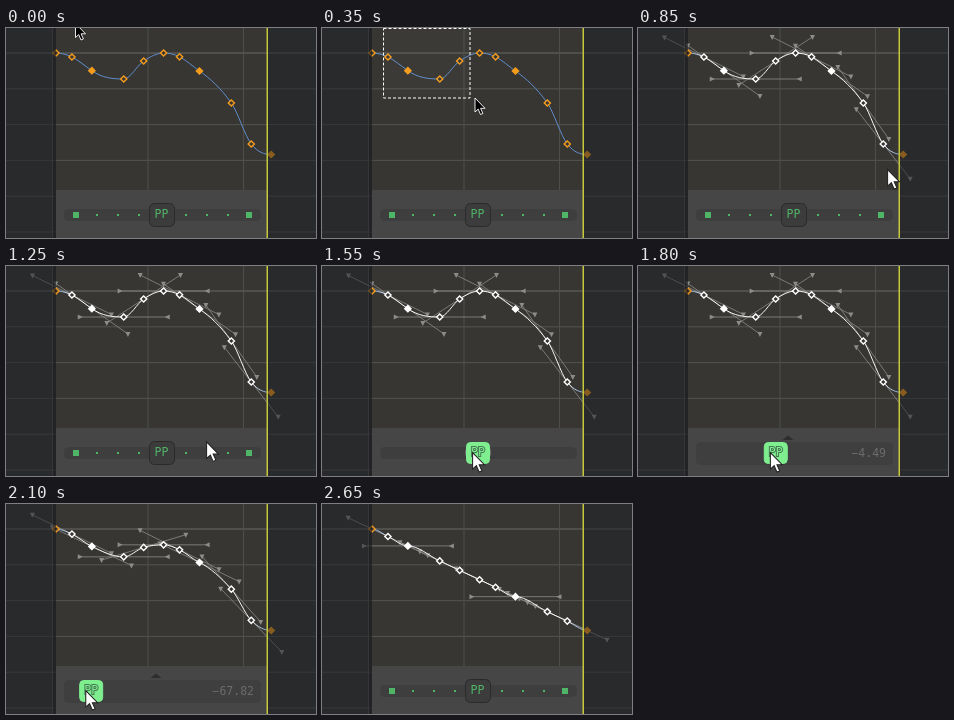
Animation of 310 by 210 pixels, one loop 3.4 s. Source, as an HTML page with a canvas:

```html
<!DOCTYPE html>
<html>
<head>
<meta charset="utf-8">
<style>
html, body { margin: 0; width: 100%; height: 100%; overflow: hidden; background: #2a2a2c; }
canvas { display: block; }
</style>
</head>
<body>
<canvas id="stage" width="310" height="210"></canvas>
<script>
const c = document.getElementById('stage').getContext('2d');
const LOOP = 3400, STEP = 50, HANDLE = 44, LEFT = 50, UNIT = 3.985;
const SELECT = 150, RELEASE = 650, PRESS = 1500, DRAG = 1696.06, DRAG_TIME = 490.49, RESET = 2650;
const MONO = '11.5px "DejaVu Sans Mono", monospace';

// key time in units, height in pixels
const keys = [[0, 25], [4, 29], [9, 42.7], [17, 51], [22, 33], [27, 25],
  [31, 28.8], [36, 43], [44, 75], [49, 116], [54, 126.5]]
  .map(([n, y]) => [LEFT + n * UNIT, y]);
const last = keys.length - 1;
const solid = i => i === 2 || i === 7;

// time, x, y of the pointer tip until the drag takes over
const pointer = [[0, 69, -5], [SELECT, 62, 0], [550, 243, 139], [RELEASE, 272, 150],
  [850, 249, 141], [900, 249, 141], [1000, 225, 170], [1100, 225, 170], [1550, 150, 186]];

function pointerAt(t) {
  const i = pointer.findIndex(p => p[0] > t);
  const [t0, x0, y0] = pointer[i - 1], [t1, x1, y1] = pointer[i];
  const k = (t - t0) / (t1 - t0);
  return [x0 + (x1 - x0) * k, y0 + (y1 - y0) * k];
}

function rect(x, y, w, h, fill) {
  c.fillStyle = fill;
  c.fillRect(x, y, w, h);
}

function round(x, y, w, h, r, fill, stroke = fill) {
  c.beginPath();
  c.roundRect(x + .5, y + .5, w - 1, h - 1, r);
  c.fillStyle = fill;
  c.fill();
  c.strokeStyle = stroke;
  c.lineWidth = 1;
  c.stroke();
}

function shape(points, fill) {
  c.beginPath();
  points.forEach(p => c.lineTo(p[0], p[1]));
  c.closePath();
  c.fillStyle = fill;
  c.fill();
}

function text(s, x, y, align, fill, outline) {
  c.font = MONO;
  c.textAlign = align;
  c.textBaseline = 'middle';
  if (outline) {
    c.strokeStyle = outline;
    c.lineWidth = 2;
    c.strokeText(s, x, y);
  }
  c.fillStyle = fill;
  c.fillText(s, x, y);
}

function drawGrid() {
  rect(0, 0, 310, 210, '#373633');
  for (let i = 0; i < 6; i++) rect(0, 24.5 + i * 35.8, 310, 1, i ? '#535350' : '#696965');
  for (let i = 0; i < 3; i++) rect(46 + i * 95.5, 0, 1, 210, '#4e4e4b');
}

function flatten(amount) {
  const [x0, y0] = keys[0], [x1, y1] = keys[last];
  return keys.map(([x, y]) => {
    const line = y0 + (y1 - y0) * (x - x0) / (x1 - x0);
    return [x, y + (line - y) * amount];
  });
}

function slopes(pts, amount) {
  return pts.map(([, y], i) => {
    if (i === 0 || i === last) return 0;
    if (solid(i)) return .7 * (1 - amount);
    const a = pts[i - 1], b = pts[i + 1];
    return (y - a[1]) * (b[1] - y) <= 0 ? 0 : (b[1] - a[1]) / (b[0] - a[0]);
  });
}

function drawHandle(x, y, dx, dy) {
  const ex = x + dx, ey = y + dy;
  c.beginPath();
  c.moveTo(x, y);
  c.lineTo(ex, ey);
  c.strokeStyle = '#82827f';
  c.lineWidth = .9;
  c.stroke();
  const s = Math.sign(dx);
  shape(Math.abs(dy) < .5 ? [[ex - 3 * s, ey], [ex + 2 * s, ey - 2.5], [ex + 2 * s, ey + 2.5]]
    : [[ex, ey + 3], [ex - 2.5, ey - 2], [ex + 2.5, ey - 2]], '#8c8c89');
}

function drawCurve(amount, selected) {
  const pts = flatten(amount), m = slopes(pts, amount);
  const picked = i => selected && i > 0 && i < last;
  const lineColor = i => picked(i) ? '#f4f4f4' : '#5f8ccb';
  pts.forEach(([x, y], i) => {
    if (!picked(i)) return;
    const dx = HANDLE / Math.hypot(1, m[i]), dy = dx * m[i];
    drawHandle(x, y, -dx, -dy);
    drawHandle(x, y, dx, dy);
  });
  for (let i = 0; i < last; i++) {
    const [x, y] = pts[i], [u, v] = pts[i + 1], d = (u - x) / 3;
    const g = c.createLinearGradient(x, 0, u, 0);
    g.addColorStop(0, lineColor(i));
    g.addColorStop(1, lineColor(i + 1));
    c.beginPath();
    c.moveTo(x, y);
    c.bezierCurveTo(x + d, y + d * m[i], u - d, v - d * m[i + 1], u, v);
    c.strokeStyle = g;
    c.lineWidth = 1;
    c.stroke();
  }
  pts.forEach(([x, y], i) => {
    const color = picked(i) ? '#fff' : '#f59c1c', r = 3.1;
    shape([[x, y - r], [x + r, y], [x, y + r], [x - r, y]],
      solid(i) || i === last ? color : '#373633');
    c.strokeStyle = color;
    c.lineWidth = 1.4;
    c.stroke();
  });
}

function drawSlider(x, travel, held, open) {
  rect(LEFT, 162, 211, 48, '#464646');
  if (open) {
    round(58, 176, 197, 23, 4, '#3f3f3f');
    shape([[144.5, 174], [150, 169.5], [155.5, 174]], '#2e2e2e');
    text('−' + (100 * travel ** 2).toFixed(2), 248, 188.5, 'right', '#6b6b6b');
  } else {
    round(58, 181, 197, 12, 4, '#3e3e3e');
    if (held) text('0.00', 156, 188, 'center', '#6b6b6b');
    else for (const side of [-1, 1]) for (let i = 0; i < 4; i++) {
      const r = i ? 1 : 3;
      rect(156.5 + side * (86.5 - 21 * i) - r, 187 - r, 2 * r, 2 * r, '#4fb567');
    }
  }
  if (held) {
    round(x - 12, 176, 24, 22, 4, '#7fee8f');
    text('PP', x, 187.5, 'center', '#7fee8f', '#467a54');
  } else {
    round(143, 175, 26, 24, 5, '#3c3c3c', '#2a2a2a');
    text('PP', 155.5, 187.5, 'center', '#4fb567');
  }
}

function drawMarquee(x, y) {
  rect(62, 0, x - 62, y, 'rgba(255,255,255,.02)');
  c.strokeStyle = '#fff';
  c.lineWidth = 1;
  c.setLineDash([3, 2]);
  c.strokeRect(61.5, .5, x - 62, y);
  c.setLineDash([]);
}

function drawPointer(x, y, dark) {
  const k = dark ? 1 : 1.18;
  c.save();
  c.translate(x, y);
  c.scale(k, k);
  shape([[.5, .5], [.5, 14.5], [3.7, 11.6], [6, 17], [8.4, 16], [6.1, 10.8], [10.5, 10.8]],
    dark ? '#000' : '#fff');
  c.strokeStyle = dark ? '#fff' : '#222';
  c.lineWidth = .9;
  c.stroke();
  c.restore();
}

function draw(t) {
  const held = t >= PRESS && t < RESET;
  const travel = Math.min(1, Math.max(0, (t - DRAG) / DRAG_TIME));
  const knob = 156 - 86 * travel;
  const [x, y] = t < 1550 ? pointerAt(t) : [knob - 6, 186];
  drawGrid();
  drawCurve(travel ** 6, t >= RELEASE);
  // dim everything outside the active range
  rect(0, 0, LEFT, 210, 'rgba(29,30,37,.5)');
  rect(262, 0, 48, 210, 'rgba(29,30,37,.5)');
  rect(47, 0, 3, 210, 'rgba(20,20,24,.3)');
  drawSlider(knob, travel, held, held && travel > 0);
  rect(260.5, 0, 1.5, 210, '#c6c83c');
  if (t >= SELECT && t < RELEASE) drawMarquee(x - 4, y);
  if (t < RESET) drawPointer(x, y, t < 700);
}

function tick() {
  const t = performance.now() % LOOP;
  draw(Math.floor(t / STEP) * STEP);
  requestAnimationFrame(tick);
}
tick();
</script>
</body>
</html>
```
